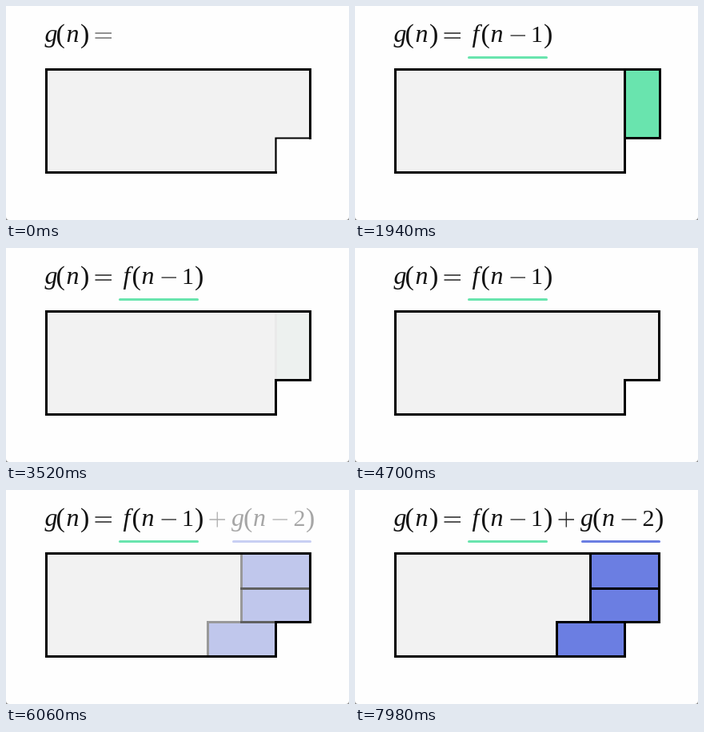
Write an HTML page that moves like this. It is 429 px wide and 268 px high and loops after 8 s.

```html
<!DOCTYPE html>
<html lang="en">
<head>
<meta charset="utf-8">
<title>g(n) = f(n − 1) + g(n − 2)</title>
<style>
  html, body { margin: 0; width: 100%; height: 100%; overflow: hidden; background: #fefefe; }
  svg { display: block; width: 429px; height: 268px; }
  text { font-family: "Liberation Serif", "Times New Roman", serif; fill: #111; }
  .var { font-size: 32px; font-style: italic; }
  .num { font-size: 30px; }
  .par { font-size: 34px; }
  .op { stroke: #222; stroke-width: 1.3; fill: none; }
  .bar { stroke-width: 3; stroke-linecap: round; }
  .box { stroke: #000; stroke-width: 3; }
  .green { fill: #69e4ae; }
  .blue { fill: #6b7ee2; }
</style>
</head>
<body>
<svg viewBox="0 0 429 268" role="img" aria-label="g(n) = f(n − 1) + g(n − 2)">
  <path class="box" fill="#f2f2f2" stroke="none" style="stroke:none"
        d="M50.5 79.5H380.5V165.5H337.5V208.5H50.5Z"/>
  <path class="box" fill="none" d="M380.5 167V79.5H50.5V208.5H339"/>
  <path id="notch" class="box" fill="none" d="M380.5 165.5H337.5V208.5"/>

  <g class="green-part"><rect class="box green" x="337.5" y="79.5" width="44" height="86"/></g>
  <g class="blue-part"><rect class="box blue" x="294.5" y="79.5" width="86" height="44"/></g>
  <g class="blue-part"><rect class="box blue" x="294.5" y="123.5" width="86" height="42"/></g>
  <g class="blue-part"><rect class="box blue" x="252.5" y="165.5" width="85" height="43"/></g>

  <g>
    <text class="var" x="48.5" y="44.5">g</text>
    <text class="par" x="62.5" y="45.5">(</text>
    <text class="var" x="75.5" y="44.5">n</text>
    <text class="par" x="93" y="45.5">)</text>
  </g>
  <path id="equals" class="op" d="M111.5 34H132M111.5 40H132"/>

  <g class="first-term">
    <text class="var" x="146.5" y="44.5">f</text>
    <text class="par" x="157.5" y="45.5">(</text>
    <text class="var" x="169.5" y="44.5">n</text>
    <path class="op" d="M194.5 37H213"/>
    <text class="num" x="220" y="44.5">1</text>
    <text class="par" x="236" y="45.5">)</text>
    <path class="bar" stroke="#69e4ae" d="M142.5 64.5H239.5"/>
  </g>

  <g class="second-term">
    <path class="op" d="M254.5 37H274M264.25 27.5V46.5"/>
    <text class="var" x="282" y="44.5">g</text>
    <text class="par" x="297" y="45.5">(</text>
    <text class="var" x="309" y="44.5">n</text>
    <path class="op" d="M333.5 37H352"/>
    <text class="num" x="359.5" y="44.5">2</text>
    <text class="par" x="375" y="45.5">)</text>
    <path class="bar" stroke="#6b7ee2" d="M284.5 64.5H380.5"/>
  </g>

  <path fill="#888" d="M0 264Q0 268 4 268H0ZM429 264Q429 268 425 268H429Z"/>
</svg>
<script>
  const LOOP = 8000;
  const FADE = 350;
  const firstIn = 490, greenOut = 3230, secondIn = 5990;

  const easeOut = p => 1 - (1 - p) ** 2;
  const fade = (t, start) => easeOut(Math.min(1, Math.max(0, (t - start) / FADE)));
  const setOpacity = (selector, value) =>
    document.querySelectorAll(selector).forEach(el => el.setAttribute('opacity', value));

  function draw(t) {
    const first = fade(t, firstIn);
    const second = fade(t, secondIn);
    setOpacity('#equals', 0.65 + 0.35 * first);
    setOpacity('.first-term', first);
    setOpacity('.green-part', first * (1 - fade(t, greenOut)));
    setOpacity('.second-term, .blue-part', second);
    document.getElementById('notch').style.strokeWidth = t < firstIn ? 2.2 : 3;
  }

  const begin = performance.now();
  function tick() {
    draw((performance.now() - begin) % LOOP);
    requestAnimationFrame(tick);
  }
  tick();
</script>
</body>
</html>
```
